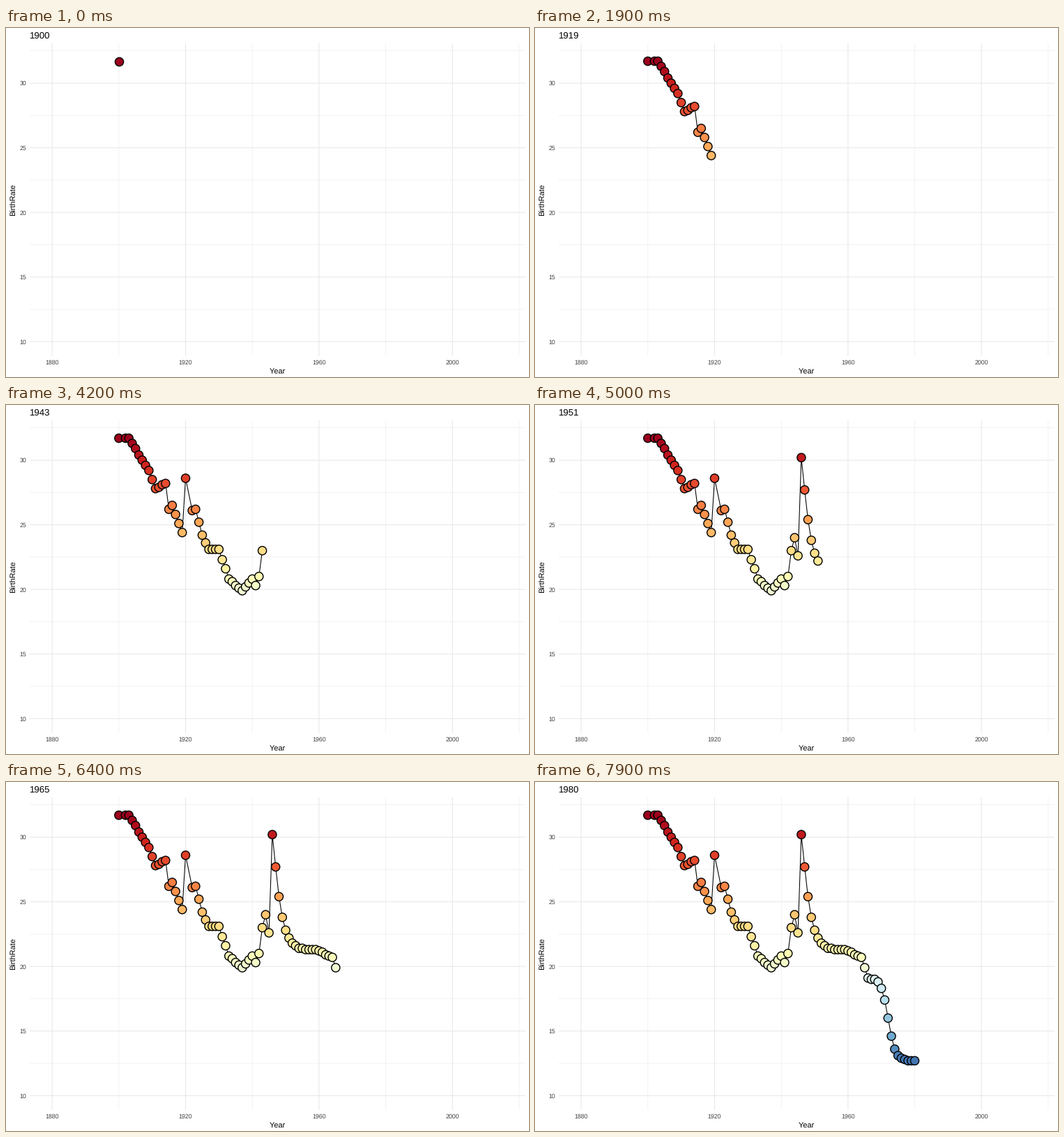
Animation of 750x500 px, one loop 8 s. Source, as a matplotlib script:

```python
import matplotlib as mpl
import matplotlib.pyplot as plt
import numpy as np
from matplotlib.animation import FuncAnimation

W, H, DPI = 750, 500, 100
PX = 72 / DPI  # points per pixel
LEFT, RIGHT, TOP, BOTTOM = 34, 744.5, 22.3, 469.5
X0, Y0 = 66.15, 79.05  # pixel place of the year 1880 and the rate 30
DX, DY = 4.784, 18.515  # pixels per year and per unit of rate
GRID, TICK = "#E8E8E8", "#404040"

plt.rcParams.update({"font.family": "Liberation Sans", "text.hinting": "none",
                     "text.kerning_factor": 10})

# Turning points of the slow trend
TURNS = [(1900, 31.7), (1903, 31.7), (1909, 29.2), (1911, 27.8), (1914, 28.2),
         (1915, 26.2), (1916, 26.5), (1919, 24.4), (1920, 28.6), (1922, 26.1),
         (1923, 26.2), (1925, 24.2), (1927, 23.1), (1930, 23.1), (1933, 20.8),
         (1937, 19.9), (1940, 20.8), (1941, 20.3), (1942, 21.0), (1943, 23.0),
         (1944, 24.0), (1945, 22.6), (1946, 21.2), (1959, 21.3), (1964, 20.7),
         (1966, 19.1), (1980, 19.2)]


def birth_rate(year):
    trend = np.interp(year, *zip(*TURNS))
    since = np.maximum(year - 1946, 0)
    boom = np.where(year >= 1946, 9 * np.exp(-0.33 * since ** 1.2), 0)
    bust = 6.5 / (1 + np.exp((1972.1 - year) / 1.1))
    return np.round(trend + boom - bust, 1)


# 1921 has no row; 1901 has a row without a value
years = np.delete(np.arange(1900, 1981), 21)
rates = birth_rate(years)
rates[1] = np.nan
fills = mpl.colormaps["RdYlBu_r"]((np.nan_to_num(rates) - 10) / 21.8) ** 1.15

fig = plt.figure(figsize=(W / DPI, H / DPI), dpi=DPI, facecolor="white")
ax = fig.add_axes([LEFT / W, 1 - BOTTOM / H,
                   (RIGHT - LEFT) / W, (BOTTOM - TOP) / H])
ax.axis("off")
ax.set_xlim(1880 + (LEFT - X0) / DX, 1880 + (RIGHT - X0) / DX)
ax.set_ylim(30 - (BOTTOM - Y0) / DY, 30 - (TOP - Y0) / DY)


def label(x, y, text, size, color="black", **kw):
    return fig.text(x / W, 1 - y / H, text, fontsize=size * PX, color=color,
                    va="baseline", rotation_mode="anchor", **kw)


def grid(xs, ys, width, zorder):
    style = dict(color=GRID, lw=width * PX, zorder=zorder, snap=False)
    for x in xs:
        ax.axvline(x, **style)
    for y in ys:
        ax.axhline(y, **style)


decades, levels = range(1880, 2001, 40), range(10, 31, 5)
grid(range(1900, 2021, 40), np.arange(12.5, 33, 5), 0.53, 0)
grid(decades, levels, 1.07, 1)
for x in decades:
    label(X0 + (x - 1880) * DX, 482, str(x), 8.8, TICK, ha="center")
for y in levels:
    label(29, Y0 + 3.3 + (30 - y) * DY, str(y), 8.8, TICK, ha="right")

label(389.2, 495, "Year", 11, ha="center")
label(13.6, 245.9, "BirthRate", 11, ha="center", rotation=90)
title = label(34, 15, "1900", 13.2, ha="left")

line, = ax.plot([], [], color="black", lw=1.07 * PX, zorder=2,
                solid_capstyle="butt", snap=False)
dots = ax.scatter([], [], s=(12.1 * PX) ** 2, edgecolors="black",
                  linewidths=1.42 * PX, zorder=3, snap=False)


def draw(i):
    n = i + 1
    shown = ~np.isnan(rates[:n])
    title.set_text(str(years[i]))
    line.set_data(years[:n], rates[:n])
    dots.set_offsets(np.column_stack([years[:n], rates[:n]])[shown])
    dots.set_facecolors(fills[:n][shown])
    return title, line, dots


anim = FuncAnimation(fig, draw, frames=len(years), interval=100,
                     repeat=True, repeat_delay=0, blit=False)
plt.show()
```
